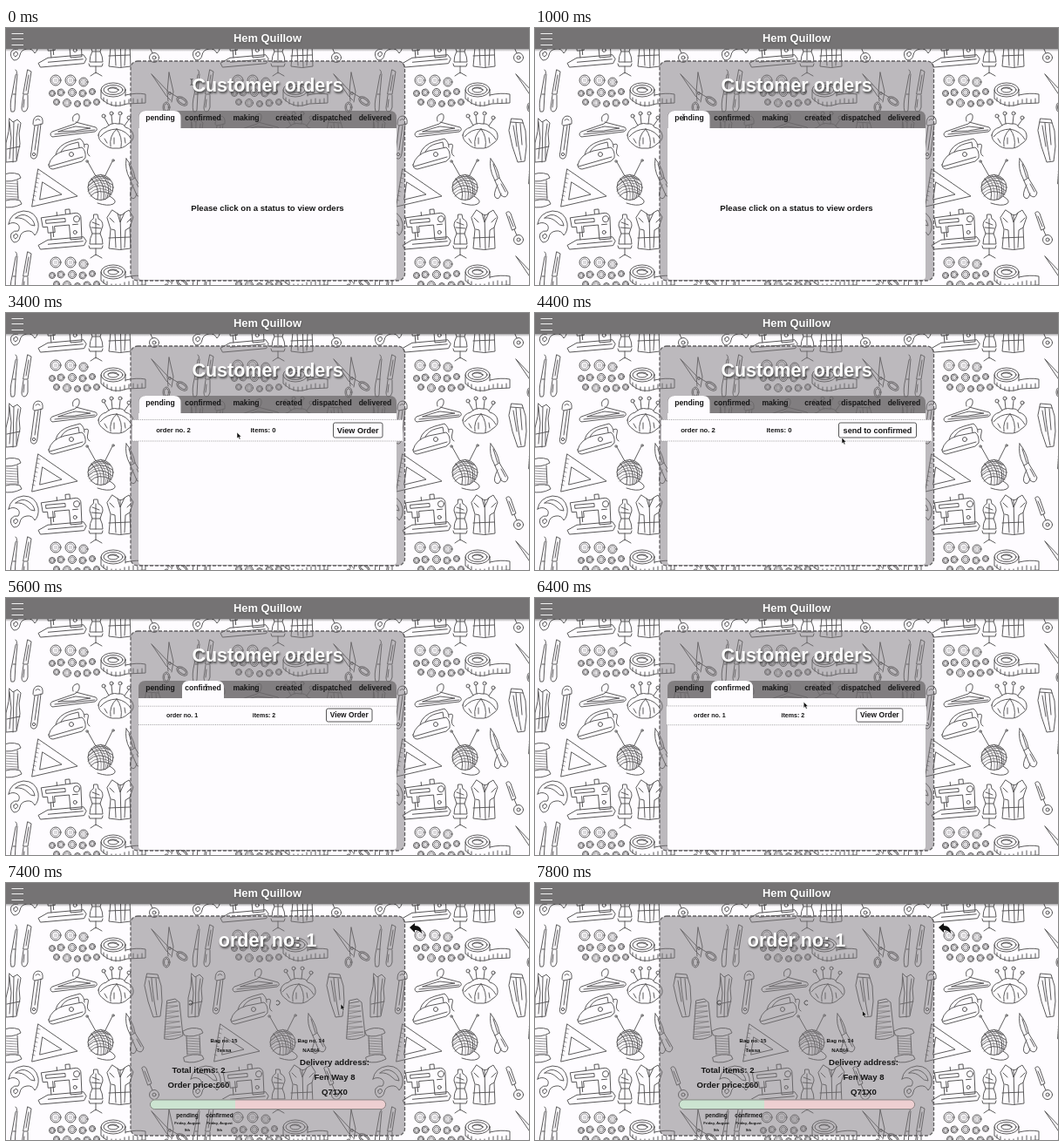
Animation, 600 px wide and 295 px high, one loop 8000 ms. Source, as an HTML page:

```html
<!DOCTYPE html>
<html lang="en">
<head>
<meta charset="utf-8">
<title>Customer orders</title>
<style>
html, body { margin: 0; width: 100%; height: 100%; overflow: hidden; background: #fefcff; }
svg { display: block; width: 600px; height: 295px; }
text { font-family: "Liberation Sans", Arial, sans-serif; font-weight: 700; text-anchor: middle; fill: #161616; }
.white { fill: #fff; }
.title { fill: #fff; font-size: 21.5px; filter: drop-shadow(1px 2px 1.2px #444); }
.tab { font-size: 8.6px; }
.mid { font-size: 9.6px; }
.small { font-size: 6.1px; }
.tiny { font-size: 4.3px; }
.ink { fill: none; stroke: #545354; stroke-width: .95; stroke-linecap: round; stroke-linejoin: round; }
.fine { stroke-width: .6; }
.dots { stroke: #888; stroke-width: .8; stroke-dasharray: 1 1.2; }
</style>
</head>
<body>
<svg viewBox="0 0 600 295">
  <defs>
    <g id="tile" class="ink">
      <!-- hook and seam ripper -->
      <path d="M11 48q3 3 0 6l-4 22q-3 12-1 20q4 1 4-2l1-19 2-22M8 76l3 0"/>
      <path d="M25 48l4 2-4 26-5 0zM20 77l-2 14q0 5 3 5t4-5v-14M21 82l-1 9M26 54l-3 18"/>
      <g id="buttons"></g>
      <!-- tape measure -->
      <ellipse cx="123" cy="71" rx="14" ry="8"/><ellipse cx="123" cy="71" rx="11" ry="5.5"/><ellipse cx="123" cy="71" rx="6" ry="3"/>
      <path d="M109 71v10q13 13 30 6l21-1v-10q-10-2-23 1M137 71v7M117 70q6-3 12 1"/>
      <path d="M112 84v-4M116 87v-5M121 89v-4M126 90v-5M131 89v-4M136 88v-5M141 86v-4M146 86v-5M151 86v-4M156 86v-5"/>
      <!-- scissors -->
      <path d="M167 53l19 20 12 7M167 53l17 25 5 5M187 51l-2 22 1 11M187 51l5 22-2 12"/>
      <circle cx="188" cy="75" r="1.5"/>
      <ellipse cx="184" cy="91" rx="4" ry="6"/><ellipse cx="184" cy="91" rx="2.4" ry="4.2"/>
      <ellipse cx="202" cy="84" rx="7" ry="4" transform="rotate(35 202 84)"/><ellipse cx="202" cy="84" rx="5" ry="2.4" transform="rotate(35 202 84)"/>
      <!-- bodice and safety pin -->
      <path d="M4 104l4 4 5-3 4 4-2 12 1 12-4 20-12 1v-22l3-13zM9 108l-1 46M4 108l2 18-2 24M14 110l-2 16 0 25M1 139l15-3"/>
      <path d="M31 110q0-9 6-9t5 9l-9 2zM40 110l-4 34q-1 7-5 6t-2-8l4-30M37 112l-4 28M34 106q3-3 5 0"/>
      <circle cx="32" cy="145" r="1.7"/>
      <!-- hanger -->
      <path d="M77 107q-2-6 3-8t4 5q-1 4-5 6l-26 9q-4 3 0 6l49-6q4-2 1-5l-23-6M60 119q14-5 20-6l17 2q-18 4-37 4M56 122l46-5"/>
      <!-- pin cushion -->
      <path d="M106 123q1-7 9-9 6-6 13-4 7-1 9 4 8 2 9 9 1 6-6 10-6 6-14 5-8 1-14-5-6-4-6-10zM127 116q-9 8-7 20M127 116q7 9 5 21M127 116q-12 0-19 9M127 116q12 2 17 12M113 127l3 5M124 126l0 7M136 126l1 6"/>
      <path d="M118 112l-5-9M122 110l-1-10M130 110l1-9M136 112l5-7"/>
      <circle cx="112" cy="101" r="2"/><circle cx="121" cy="98" r="2"/><circle cx="131" cy="98" r="2"/><circle cx="141" cy="103" r="2"/>
      <!-- iron -->
      <path d="M49 157q3-12 18-16l20-4q5 4 4 12l-4 4-33 9q-5 0-5-5zM50 159l38-11M57 145q3-11 17-15l11-3q5 4 5 10M63 142q4-7 12-9l8-2 1 6M90 134q6-3 4 4t2 9"/>
      <circle cx="75" cy="145" r="2.5"/>
      <!-- trousers and cone -->
      <path d="M162 104l12 1 4 13 1 18-2 17-8 1-6-18-4-18zM161 108l14 1M167 109q1 18 6 43M172 110l2 24M164 112l4 24"/>
      <path d="M185 135l9-2 5 4 4 38q-9 6-21 4zM185 138l11-2"/>
      <path class="fine" d="M184 141l13 0M184 144l13-3M184 147l14 0M184 150l14-3M183 153l15 0M183 156l15-3M183 159l16 0M183 162l16-3M182 165l18 0M182 168l18-3M182 171l18 0M182 174l19-3M182 177l19-3"/>
      <!-- spool -->
      <path d="M-6 170q10-6 21-2l2 4q-11 6-21 3zM-2 176l1 21M13 175l1 21M-5 200q10-5 21-2l2 4q-11 6-22 3z"/>
      <path class="fine" d="M-2 178l15 1M-2 181l15 1M-2 184l15 1M-2 187l15 1M-2 190l15 1M-1 193l15 1M-1 196l15 0"/>
      <!-- set square and yarn -->
      <path d="M37 162l45 31-52 12zM42 177l22 14-25 6z"/>
      <path class="fine" d="M36 167l3 1M35 172l3 1M34 177l3 1M33 182l3 1M32 187l3 1M31 192l3 1M30 197l3 1"/>
      <circle cx="108.5" cy="183" r="14.5"/>
      <path d="M95 177q12-12 24-3M94 182q12-14 28-2M94 187q13-13 28 0M97 193q8-10 24-2M103 169q12 10 9 28M109 168q13 12 7 27M98 173q10 10 7 24M94 154l9 16M122 153l-8 16M119 193q10 6 4 9t-18-1"/>
      <path class="fine" d="M95 180q12-13 25-5M94 185q13-14 28-2M95 190q13-11 26-1M106 169q12 11 8 28M101 170q10 12 8 28M112 169q12 12 6 24"/>
      <circle cx="93" cy="153" r="1.2"/><circle cx="123" cy="152" r="1.2"/>
      <!-- snips -->
      <path d="M138 150q8 10 10 22l10 17q-2 8-8 3l-8-19q-6-11-4-23zM148 172l-5 3M141 156l5 16M150 179l5 9M146 180q-6 12-2 15t6-5"/>
      <!-- french curve -->
      <path d="M3 225q2-13 17-15 14 0 17 14 1 9-4 14-3-6-9-5-7 1-8 7t-7 6q-5-4-3-10 3-4 8-3 3-5-1-8-5-3-10 0zM11 218q7-6 14-2t8 11q-5 0-8-4-6-6-14-5zM9 238q2-3 4-1t-2 5q-3-1-2-4z"/>
      <!-- sewing machine -->
      <g transform="rotate(-5 62 232)">
        <path d="M42 216l40-2q6 1 5 8l-1 22H73v-17H56v7h-8v-7h-5zM36 247l11-5h41l3 5-3 5H38zM51 234v8M47 247h40M47 219h22v4H47zM54 227v12M77 227h6"/>
        <circle cx="82" cy="221" r="3.5"/><circle cx="79" cy="236" r="2"/><path d="M70 214v-5h5v5M60 215v-4"/>
      </g>
      <!-- dress form and top -->
      <path d="M101 214h4l1 5q5 2 5 8l-3 9q3 6 3 12H96q0-7 3-12l-3-9q0-6 4-8zM103 219v29M99 236h9M95 250l1 3h14l1-3M103 253v8M97 264l6-4 7 4M99 223l8 3M98 229l11 1"/>
      <path d="M122 209l6 4q4 4 8-1l5-3 5 8-4 12 1 24q-12 3-25 0l2-22-4-13zM131 215l1 39M121 231l4 1 1 20M142 229l-5 3-1 20M128 213l3 10 5-11M118 241l24-1M119 218l5 5M144 218l-5 5"/>
      <!-- tracing wheel -->
      <path d="M156 212q3-3 5 1l6 17-4 2zM165 231l3 7M159 216l5 12"/>
      <circle cx="170" cy="243" r="5.5"/><circle cx="170" cy="243" r="2"/>
    </g>
    <clipPath id="bar"><rect x="165" y="248.5" width="271" height="11.5" rx="5.5"/></clipPath>
    <linearGradient id="shade" x2="0" y2="1"><stop stop-color="#000" stop-opacity=".35"/><stop offset="1" stop-color="#000" stop-opacity="0"/></linearGradient>
  </defs>
  <rect width="600" height="295" fill="#fefcff"/>
  <g id="wall"></g>
  <rect x="143" y="38" width="314.5" height="252" rx="8" fill="#7c797c" fill-opacity=".5" stroke="#605e60" stroke-width="1.3" stroke-dasharray="4 2"/>
  <rect y="24" width="600" height="3" fill="url(#shade)"/>
  <rect width="600" height="24" fill="#757374"/>
  <path d="M6.5 6.5h13.5M6.5 12.5h13.5M6.5 19.5h13.5" stroke="#fff" stroke-width=".9"/>
  <text class="white" x="300" y="16" font-size="12.9" style="filter:drop-shadow(0 1px 1px #555)">Hem Quillow</text>

  <g id="list">
    <text class="title" x="300" y="73">Customer orders</text>
    <path d="M152 115v-12q0-8 8-8h280q8 0 8 8v12z" fill="#6b696a" fill-opacity=".72"/>
    <path id="active" d="M0 115v-12q0-8 8-8h32q8 0 8 8v12z" fill="#fefcff"/>
    <g id="tabs"></g>
    <path d="M152 115h296v170q0 4-4 4H156q-4 0-4-4z" fill="#fefcff"/>
    <text id="hint" class="mid" x="300" y="210">Please click on a status to view orders</text>
    <g id="row">
      <rect id="strip" fill="#fefcff"/>
      <line id="top" class="dots"/><line id="low" class="dots"/>
      <text id="order"></text><text id="items"></text>
      <rect id="btn" rx="2" fill="#fefcff" stroke="#444" stroke-width=".9"/>
      <text id="label"></text>
    </g>
    <g id="status">
      <path d="M0 287h197q3 0 3 3v5H0z" fill="#d2d1d2"/>
      <text x="2" y="292.5" style="font-size:5px;font-weight:400;text-anchor:start;fill:#444">Waiting for backpack-project-pea75x.netlify.app...</text>
    </g>
  </g>

  <g id="detail">
    <text class="title" x="300" y="73">order no: 1</text>
    <path d="M463 51l6-5v3q8 0 8 9q-3-4-8-4v3z" fill="#111"/>
    <g id="spin"></g>
    <text class="small" x="250" y="182.5">Bag no. 15</text><text class="small" x="350" y="182.5">Bag no. 14</text>
    <text class="small" x="250" y="193.5">Tessa</text><text class="small" x="350" y="193.5">NADIA</text>
    <text class="mid" x="221" y="217.5">Total items: 2</text>
    <text class="mid" x="221" y="234.5">Order price:£60</text>
    <text class="mid" x="377" y="209">Delivery address:</text>
    <text class="mid" x="377" y="226">Fen Way 8</text>
    <text class="mid" x="377" y="242.5">Q71X0</text>
    <g clip-path="url(#bar)"><rect x="165" y="248" width="271" height="12" fill="#eecfd1"/><rect x="165" y="248" width="98" height="12" fill="#cce4d1"/></g>
    <rect x="165.4" y="248.9" width="270.2" height="10.7" rx="5.3" fill="none" stroke="#777" stroke-width=".9"/>
    <g id="dates"></g>
  </g>
  <g id="cursor">
    <path id="arrow" d="M0 0v7l1.6-1.4 1.1 2.5 1.3-.6-1.1-2.4h2.1z" fill="#111" stroke="#fff" stroke-width=".5"/>
    <path id="beam" d="M-1.5 -3.5q1.5 0 1.5 1v5q0 1 1.5 1M1.5 -3.5q-1.5 0-1.5 1M0 2.5q0 1-1.5 1" fill="none" stroke="#222" stroke-width=".7"/>
  </g>
</svg>
<script>
const $ = id => document.getElementById(id);
const set = (id, attrs) => { for (const k in attrs) $(id).setAttribute(k, attrs[k]); };
const show = (id, on) => set(id, { visibility: on ? "visible" : "hidden" });
const mix = (a, b, k) => a + (b - a) * k;
const ease = k => k * k * (3 - 2 * k);
const ramp = (t, a, b) => ease(Math.min(1, Math.max(0, (t - a) / (b - a))));

const LOOP = 8000, STEP = 200, SWITCH = 7400;

// static parts
const buttons = [[57,60,6],[74,60,6],[89,62,5],[53,75,3.5],[63,74,4],[76,74,4.5],[88,75,4],[99,73,3.5],[58,85,3.5],[70,86,4.5],[82,87,3.5],[93,86,4],[104,85,3.5]];
$("buttons").innerHTML = buttons.map(([x, y, r]) =>
  `<circle cx="${x}" cy="${y}" r="${r}"/><circle cx="${x}" cy="${y}" r="${r * .68}" class="fine"/>` +
  `<path d="M${x - 1} ${y - 1}h.1m2 0h.1m0 2h-.1m-2 0h-.1"/>`).join("");

let wall = "";
for (let x = -209; x < 600; x += 209)
  for (let y = -209; y <= 209; y += 209) wall += `<use href="#tile" x="${x}" y="${y}"/>`;
$("wall").innerHTML = wall;

const tabs = { pending: 177, confirmed: 226, making: 275.5, created: 324.5, dispatched: 374, delivered: 423.5 };
$("tabs").innerHTML = Object.entries(tabs).map(([s, x]) => `<text class="tab" x="${x}" y="105.5">${s}</text>`).join("");

$("dates").innerHTML = [["pending", 208], ["confirmed", 245]].map(([s, x]) =>
  `<text x="${x}" y="269" font-size="6.5">${s}</text><text class="tiny" x="${x}" y="277">Friday, August</text>` +
  `<text class="tiny" x="${x}" y="284.5">9th</text>`).join("");

// pointer stops: time, x, y
const stops = [[0,213,62],[1000,170.5,102.5],[2200,170.5,102.5],[3400,265,137],[3800,388,134],[4000,388,134],
  [4400,352,143],[5200,229.5,102.5],[5800,229.5,102.5],[7000,387,136],[7200,387,136],[7800,375.5,146.5]];

function pointer(t) {
  const i = stops.findIndex(s => s[0] > t);
  if (i < 0) return stops[stops.length - 1].slice(1);
  const a = stops[i - 1], b = stops[i], k = ease((t - a[0]) / (b[0] - a[0]));
  return [mix(a[1], b[1], k), mix(a[2], b[2], k)];
}

function drawRow(t) {
  const grow = ramp(t, 2700, 3100) - ramp(t, 4600, 5000) + ramp(t, 6300, 6700);
  const send = t >= 3800 && t < 5600, second = t >= 5600;
  const g = (a, b) => mix(a, b, grow);
  const left = g(152, 145), right = g(448, 455), top = g(124.2, 122.5), low = g(145.5, 147);
  set("strip", { x: left, y: top, width: right - left, height: low - top });
  set("top", { x1: left, x2: right, y1: top, y2: top });
  set("low", { x1: left, x2: right, y1: low, y2: low });
  const size = g(7, 7.7), y = 137;
  set("order", { x: send ? g(197, 187) : g(202, 192), y, "font-size": size });
  set("items", { x: send ? 280 : g(296, 295), y, "font-size": size });
  $("order").textContent = "order no. " + (second ? 1 : 2);
  $("items").textContent = "items: " + (second ? 2 : 0);
  const x = send ? g(342, 348) : g(367, 375), w = send ? g(84, 90) : g(53.5, 57.5), h = g(16, 18);
  set("btn", { x: x + .5, y: 135 - h / 2, width: w - 1, height: h - 1 });
  set("label", { x: x + w / 2, y: g(137.4, 137.7), "font-size": g(8.4, 9.1) });
  $("label").textContent = send ? "send to confirmed" : "View Order";
}

function draw(t) {
  const listing = t < SWITCH;
  $("list").style.display = listing ? "" : "none";
  $("detail").style.display = listing ? "none" : "";
  set("active", { transform: `translate(${t < 5600 ? 152.5 : 202} 0)` });
  show("hint", t < 1800);
  $("row").style.display = t < 1800 ? "none" : "";
  $("status").style.display = t < 7000 ? "none" : "";
  drawRow(t);

  const turn = (t - 7800) * .45;
  $("spin").innerHTML = [211.5, 311.5].map(x =>
    `<path d="M1.6 -1.9A2.5 2.5 0 1 0 1.6 1.9" transform="translate(${x} 137.5) rotate(${turn})" fill="none" stroke="#333" stroke-width=".8"/>`).join("");

  const [x, y] = pointer(t), text = t < STEP || (y > 98 && y < 110);
  set("cursor", { transform: `translate(${x} ${y})` });
  show("arrow", !text);
  show("beam", text);
}

const start = performance.now();
function tick() {
  const t = (performance.now() - start) % LOOP;
  draw(Math.floor(t / STEP) * STEP);
  requestAnimationFrame(tick);
}
tick();
</script>
</body>
</html>
```
